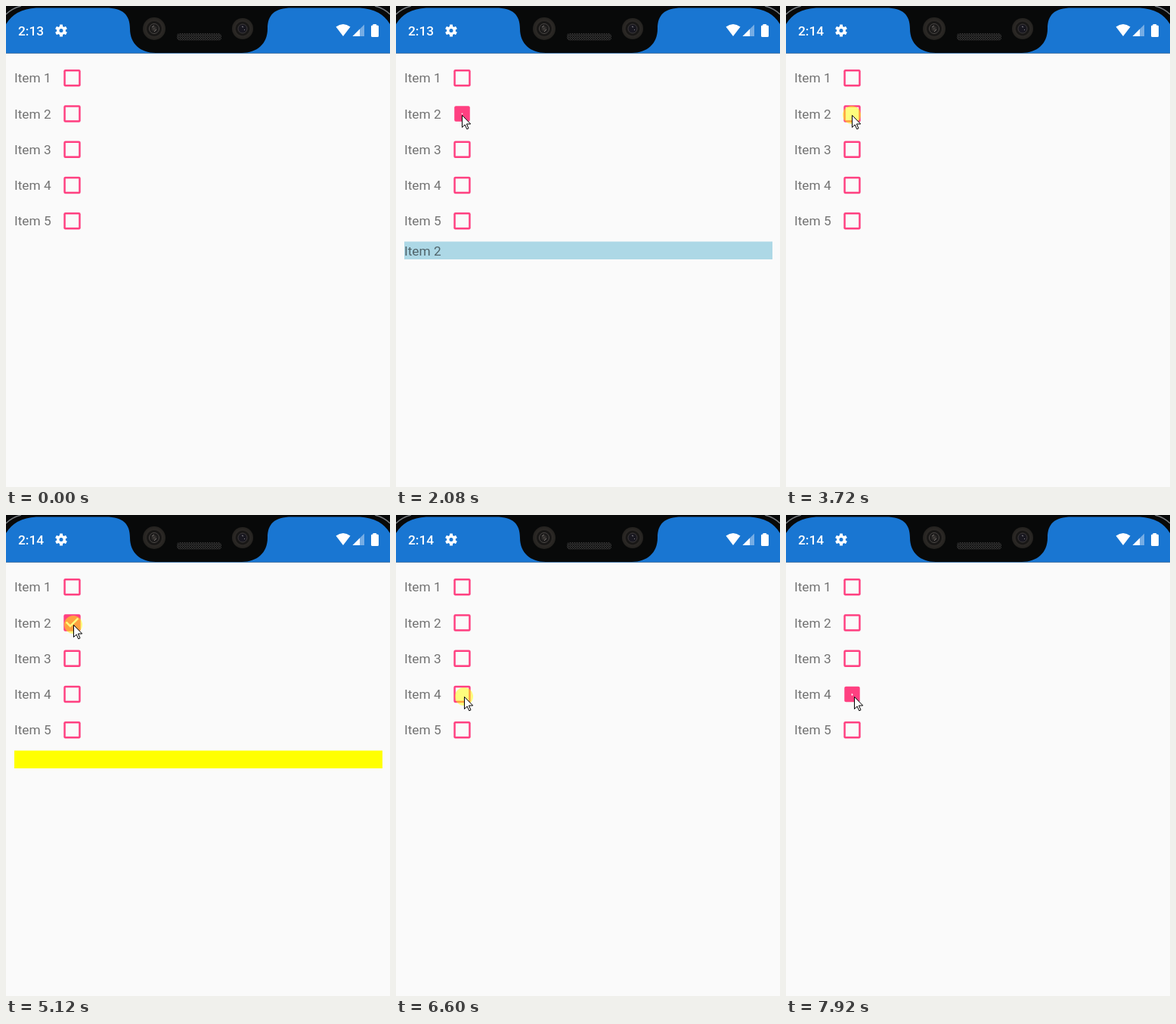
Write an HTML page that moves like this. It is 508 px wide and 636 px high and loops after 8000 ms.

```html
<!DOCTYPE html>
<html lang="en">
<head>
<meta charset="utf-8">
<title>Checkbox list</title>
<style>
  html, body { margin: 0; width: 100%; height: 100%; overflow: hidden; background: #fafafa; }
  svg { display: block; }
  text { font: 17.3px Roboto, sans-serif; fill: rgba(0, 0, 0, .54); }
  #clock { font-weight: 500; fill: #fff; }
  .tick { fill: none; stroke: #fafafa; stroke-width: 2.5; vector-effect: non-scaling-stroke; }
</style>
</head>
<body>
<svg id="stage" width="508" height="636" viewBox="0 0 508 636">
  <defs>
    <pattern id="mesh" width="3" height="3" patternUnits="userSpaceOnUse">
      <rect width="3" height="3" fill="#3b3b3b"/>
      <circle cx="1" cy="1" r="1" fill="#080808"/>
      <circle cx="2.5" cy="2.5" r=".8" fill="#080808"/>
    </pattern>
    <radialGradient id="lens">
      <stop offset="0" stop-color="#45413e"/>
      <stop offset=".3" stop-color="#1b1a1a"/>
      <stop offset=".62" stop-color="#171615"/>
      <stop offset=".7" stop-color="#2c2926"/>
      <stop offset="1" stop-color="#24221f"/>
    </radialGradient>
  </defs>
  <rect width="508" height="636" fill="#fafafa"/>

  <g id="phone">
    <rect width="508" height="62.5" fill="#080909"/>
    <path d="M0 24Q12 4 40 2.5H132C155 2.5 164 12 164 30C164 50 178 62 198 62H312C332 62 346 50 346 30C346 12 355 2.5 378 2.5H468Q496 4 508 24V62.5H0Z" fill="#1976d2"/>
    <path d="M0 11Q8 3 20 0M508 11Q500 3 488 0" fill="none" stroke="#777c80" stroke-width="1.5"/>
    <circle cx="196" cy="30" r="15" fill="url(#lens)"/>
    <circle cx="196" cy="30" r="6.5" fill="none" stroke="#4a4745"/>
    <path d="M193 28l3-2M196 34l3-3" stroke="#77736f"/>
    <circle cx="313" cy="30" r="14" fill="url(#lens)"/>
    <circle cx="313" cy="30" r="6" fill="#191820" stroke="#3b3839"/>
    <path d="M312 27l2 1M315 32l1-1" stroke="#8a878d"/>
    <rect x="226" y="36" width="59" height="9.5" rx="4" fill="url(#mesh)"/>
  </g>

  <g id="status" fill="#fff">
    <text id="clock" x="16" y="39"></text>
    <g id="gear" transform="translate(73 32.5)">
      <circle r="4.2" fill="none" stroke="#fff" stroke-width="3.4"/>
    </g>
    <path d="M436.5 27.5Q446 20.500 455.500 27.500L446 40Z"/>
    <path d="M474 24.500V40H458.500Z" opacity=".4"/>
    <path d="M468 30.500V40H458.500Z"/>
    <path d="M485.500 25.500V24H490V25.500H491.500Q493 25.500 493 27V39.500Q493 41 491.500 41H484.500Q483 41 483 39.500V27Q483 25.500 484.500 25.500Z"/>
  </g>

  <g id="rows"></g>
  <g id="label">
    <rect id="bar" x="11" y="311.500" width="487" height="23.500"/>
    <text id="caption" x="11" y="330"></text>
  </g>
  <circle id="press" r="12" fill="#ff0" opacity=".5"/>
  <path id="cursor" d="M.5 .5V16.500L4.200 13L6.800 18.800L9 17.800L6.400 12H11.700Z" fill="#fff" stroke="#000"/>
</svg>
<script>
const LOOP = 8000, SCALE = 1.243;
const $ = id => document.getElementById(id);
const clamp = v => Math.min(1, Math.max(0, v));

function add(parent, tag, attrs, text = '') {
  const el = document.createElementNS('http://www.w3.org/2000/svg', tag);
  for (const name in attrs) el.setAttribute(name, attrs[name]);
  el.textContent = text;
  parent.append(el);
  return el;
}

for (let a = 0; a < 360; a += 60)
  add($('gear'), 'rect', { x: -2, y: -8, width: 4, height: 4, rx: .6, transform: `rotate(${a})` });

const boxes = [1, 2, 3, 4, 5].map(n => {
  const y = 95.2 + (n - 1) * 47.25;
  add($('rows'), 'text', { x: 11, y: y + 6.2 }, `Item ${n}`);
  const group = add($('rows'), 'g', {});
  add(group, 'rect', { x: -9, y: -9, width: 18, height: 18, rx: 1.8, fill: '#ff4081' });
  const hole = add(group, 'rect', { x: -7, y: -7, width: 14, height: 14, fill: '#fafafa' });
  const tick = add(group, 'path', { class: 'tick', d: 'M-6.3 -.7L-2 3.6L6.3 -4.7' });
  return { y, group, hole, tick };
});

// Pointer moves: start, end, number of steps, target, ease power, sideways bend
const entry = [471, 667];
const moves = [
  [380, 1140, 11, 126, 129, 2, 0],
  [1220, 1850, 9, 87, 144, 1.6, 0],
  [4890, 4970, 2, 89, 145, 1, 0],
  [5820, 6370, 8, 90, 240, 1.22, -9]
];
const presses = [[1930, 2080], [2940, 3020], [3720, 3880], [5120, 5200], [6540, 6620], [7690, 7840]];
// Toggles: time, item, checked, lead into the transition
const toggles = [
  [2080, 2, true, 150], [3020, 2, false, 40], [3880, 2, true, 60],
  [5200, 2, false, 80], [6620, 4, true, 60], [7840, 4, false, 80]
];
const labels = [
  [2080, 3020, '#add8e6', 'Item 2'], [3880, 5200, '#ff0', ''], [6620, 7840, '#ff0', '']
];
const active = (list, t) => list.find(([from, to]) => t >= from && t < to);

function pointerAt(t) {
  let [x, y] = entry;
  for (const [start, end, steps, tx, ty, power, bend] of moves) {
    if (t < start) break;
    const gap = (end - start) / (steps - 1);
    const p = clamp((Math.floor((t - start) / gap + 1e-6) + 1) / steps);
    const e = 1 - (1 - p) ** power;
    x += (tx - x) * e + bend * Math.sin(Math.PI * p) ** 2;
    y += (ty - y) * e;
  }
  return [x, y];
}

function drawBox({ y, group, hole, tick }, checked, age) {
  const closing = 1 - clamp(age / 166), opening = clamp((age - 166) / 250);
  const open = checked ? closing : opening;
  const mark = checked ? opening : closing;
  const dip = age < 166 ? age / 166 : 1 - opening;
  group.setAttribute('transform', `translate(87.5 ${y}) scale(${SCALE * (1 - .09 * dip)})`);
  hole.setAttribute('transform', `scale(${open})`);
  tick.setAttribute('transform', `scale(${Math.max(.05, mark)})`);
  tick.style.display = mark > 0 ? '' : 'none';
}

function draw(t) {
  $('clock').textContent = t < 2400 ? '2:13' : '2:14';

  boxes.forEach((box, i) => {
    const last = toggles.filter(([at, item]) => item === i + 1 && at <= t).pop();
    if (!last) return drawBox(box, false, 1000);
    const [at, , checked, lead] = last;
    drawBox(box, checked, Math.floor((t - at) / 78) * 78 + lead);
  });

  const label = active(labels, t);
  $('label').style.display = label ? '' : 'none';
  if (label) {
    $('bar').setAttribute('fill', label[2]);
    $('caption').textContent = label[3];
  }

  const place = `translate(${pointerAt(t).map(Math.round).join(' ')})`;
  $('cursor').setAttribute('transform', place);
  $('press').setAttribute('transform', place);
  $('cursor').style.display = t < 380 ? 'none' : '';
  $('press').style.display = active(presses, t) ? '' : 'none';
}

const began = performance.now();
function tickFrame() {
  draw((performance.now() - began) % LOOP);
  requestAnimationFrame(tickFrame);
}
tickFrame();
</script>
</body>
</html>
```
